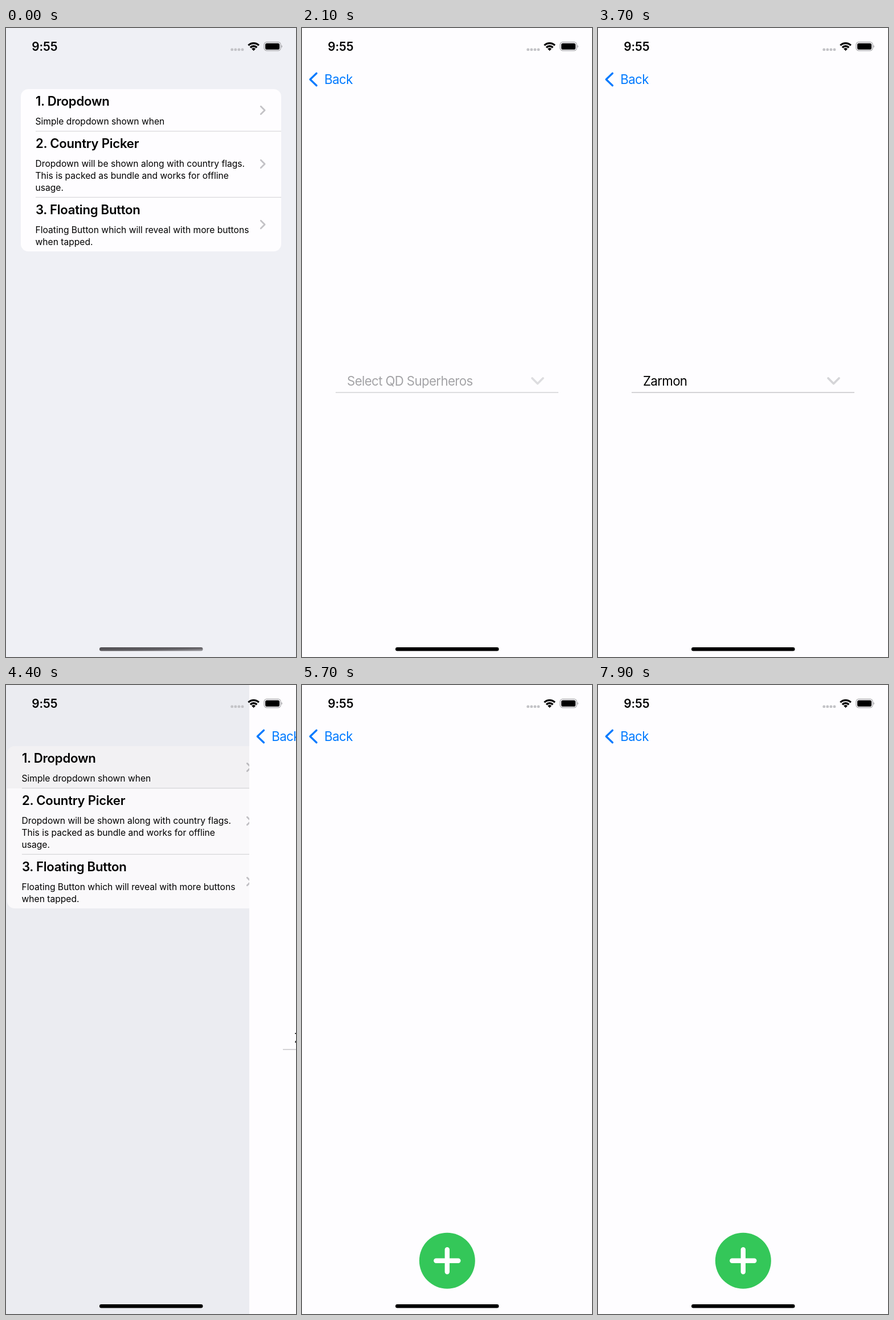
Recreate the animation shown at these times as an HTML page. Size 509x1101 px, loop 8 s.

```html
<!DOCTYPE html>
<html lang="en">
<head>
<meta charset="utf-8">
<title>Component demo</title>
<style>
  html, body { margin: 0; width: 100%; height: 100%; overflow: hidden; background: #fefdff; }
  svg { display: block; font-family: Inter, "Noto Sans", sans-serif; }
  .title { font-size: 22.2px; font-weight: 600; letter-spacing: -0.27px; }
  .note { font-size: 15.66px; letter-spacing: -0.02px; }
  .body { font-size: 22.2px; letter-spacing: -0.6px; }
  .clock { font-size: 20.9px; font-weight: 600; letter-spacing: -0.1px; }
  .line { fill: none; stroke-linecap: round; stroke-linejoin: round; }
</style>
</head>
<body>
<svg width="509" height="1101" viewBox="0 0 509 1101">
  <defs>
    <clipPath id="cardClip"><rect x="26" y="107" width="457" height="284" rx="13"/></clipPath>
    <clipPath id="menuClip"><rect x="92" y="303" width="326" height="287" rx="16"/></clipPath>
    <linearGradient id="barFade" x2="1" y2="1">
      <stop offset="0" stop-color="#4f4d51"/>
      <stop offset=".6" stop-color="#615f63"/>
      <stop offset="1" stop-color="#a09fa4"/>
    </linearGradient>
  </defs>

  <rect width="509" height="1101" fill="#eff0f5"/>
  <g id="list">
    <g clip-path="url(#cardClip)">
      <rect x="26" y="107" width="457" height="284" fill="#fefdff"/>
      <path d="M52 180.7H483M52 296.3H483" stroke="#d9d9dc" stroke-width="1.2"/>
      <rect id="rowTop" x="26" y="107" width="457" height="74" fill="#cbcbcf"/>
      <rect id="rowEnd" x="26" y="296" width="457" height="95" fill="#cbcbcf"/>
    </g>
    <g id="rows"></g>
  </g>
  <rect id="shade" width="509" height="1101"/>

  <g id="dropPage">
    <rect width="509" height="1101" fill="#fefdff"/>
    <g class="back"></g>
    <g id="field">
      <text id="choice" class="body" x="79" y="626"></text>
      <path class="line" d="M404 613l9.5 9.5 9.5-9.5" stroke="#d5d5d8" stroke-width="3.8"/>
      <path d="M59 638H450" stroke="#c6c6c9" stroke-width="1.3"/>
    </g>
    <g id="menu">
      <g clip-path="url(#menuClip)">
        <rect x="92" y="303" width="326" height="287" fill="#f4f3f6"/>
        <g id="items"></g>
      </g>
    </g>
  </g>

  <g id="fabPage">
    <rect width="509" height="1101" fill="#fefdff"/>
    <g class="back"></g>
    <g id="extras" fill="#34c759"></g>
    <circle cx="254.8" cy="1007.7" r="49" fill="#34c759"/>
    <path id="plus" class="line" d="M235.3 1007.7h39M254.8 988.2v39" stroke="#fff" stroke-width="8.4"/>
  </g>

  <text class="clock" x="45.2" y="40">9:55</text>
  <g fill="#c3c3c7" id="dots"></g>
  <g fill="none" stroke="#000" stroke-width="3.4">
    <path d="M425.4 30.4a13 13 0 0 1 18.4 0"/>
    <path d="M428.9 34.2a8 8 0 0 1 11.4 0"/>
    <path d="M434.6 40l-3.4-3.5a4.8 4.8 0 0 1 6.8 0z" fill="#000" stroke="none"/>
  </g>
  <rect x="453.1" y="24.7" width="29" height="15" rx="4.6" fill="none" stroke="#a3a3a6" stroke-width="1.3"/>
  <rect x="455.1" y="26.7" width="25" height="11" rx="2.8"/>
  <path d="M483.5 29.7q3 2.5 0 5z" fill="#a3a3a6"/>
  <rect id="bar" x="164" y="1084" width="181.5" height="6.4" rx="3.2"/>
</svg>

<script>
const STAGE = 509, LOOP = 8000, STEP = 100;
const OPEN_DROP = 411, CLOSE_DROP = 4220, OPEN_FAB = 4974.2;
const $ = id => document.getElementById(id);
const text = (cls, x, y, s) => `<text class="${cls}" x="${x}" y="${y}">${s}</text>`;
const clamp = v => Math.min(1, Math.max(0, v));
const ramp = (t, a, b) => clamp((t - a) / (b - a));

// Critically damped spring from 0 to 1
const spring = (ms, rate = 18.26) => {
  const x = Math.max(0, ms) * rate / 1000;
  return 1 - (1 + x) * Math.exp(-x);
};

const rows = [
  { y: 136, mid: 144, title: "1. Dropdown", notes: ["Simple dropdown shown when"] },
  { y: 210, mid: 238, title: "2. Country Picker", notes: [
    "Dropdown will be shown along with country flags.",
    "This is packed as bundle and works for offline",
    "usage."] },
  { y: 326, mid: 344, title: "3. Floating Button", notes: [
    "Floating Button which will reveal with more buttons",
    "when tapped."] }
];
$("rows").innerHTML = rows.map(r =>
  text("title", 52, r.y, r.title) +
  r.notes.map((n, i) => text("note", 51.5, r.y + 33.3 + i * 20.9, n)).join("") +
  `<path class="line" d="M447.3 ${r.mid - 6.7}l6.8 6.7-6.8 6.7" stroke="#3c3c43" stroke-opacity=".3" stroke-width="2.8"/>`
).join("");

document.querySelectorAll(".back").forEach(g => {
  g.innerHTML = '<path class="line" d="M25.5 79.3L14.3 90l11.2 10.7" stroke="#007aff" stroke-width="3.3"/>' +
    '<text class="body" x="39.3" y="98" fill="#007aff">Back</text>';
});

const heroes = ["Zarmon", "Quillax", "Brovian", "Tessik", "Moldrun"];
$("items").innerHTML = heroes.map((name, i) => {
  const y = 303 + i * 57.4;
  return text("body", 113, y + 36.5, name) +
    (i ? `<path d="M92 ${y}h326" stroke="#d9d9dc" stroke-width="1"/>` : "");
}).join("");

$("dots").innerHTML = [0, 1, 2, 3].map(i =>
  `<rect x="${394.4 + i * 6.1}" y="35.6" width="4.6" height="4.4" rx="1.6"/>`).join("");
$("extras").innerHTML = '<circle cx="254.8"/>'.repeat(3);
const extras = [...$("extras").children];

function slide(id, p) {
  const g = $(id);
  g.setAttribute("transform", `translate(${Math.round(STAGE * (1 - p))} 0)`);
  g.setAttribute("visibility", p > 0.001 ? "visible" : "hidden");
}

function draw(t) {
  const leave = spring(t - CLOSE_DROP);
  const drop = clamp(spring(t - OPEN_DROP) - leave);
  const fab = spring(t - OPEN_FAB);
  const cover = Math.max(drop, fab);

  $("list").setAttribute("transform", `translate(${Math.round(-0.3 * STAGE * cover)} 0)`);
  $("shade").setAttribute("opacity", 0.1 * cover);
  $("rowTop").setAttribute("opacity", t > OPEN_DROP ? 1 - leave : 0);
  $("rowEnd").setAttribute("opacity", t > OPEN_FAB ? 1 : 0);
  slide("dropPage", drop);
  slide("fabPage", fab);

  const picked = t >= 3300;
  $("choice").textContent = picked ? heroes[0] : "Select QD Superheros";
  $("choice").setAttribute("fill", picked ? "#000" : "#8a8a8e");
  $("field").setAttribute("opacity", 1 - 0.22 * ramp(t, 2000, 2100) * (1 - ramp(t, 2200, 2500)));

  const open = spring(t - 2130, 14) - spring(t - 3080, 16);
  const size = 0.2 + 0.8 * open;
  $("menu").setAttribute("opacity", clamp(open * 1.4));
  $("menu").setAttribute("display", open > 0.01 && t < 3700 ? "inline" : "none");
  $("menu").setAttribute("transform", `translate(254.8 590) scale(${size}) translate(-254.8 -590)`);

  const reveal = t < 7900 ? clamp(spring(t - 5950, 10) - spring(t - 7200, 12)) : 0;
  $("plus").setAttribute("transform", `rotate(${45 * reveal} 254.8 1007.7)`);
  extras.forEach((c, i) => {
    c.setAttribute("cy", 1007.7 - reveal * (100 + i * 88));
    c.setAttribute("r", 36 * reveal);
  });

  $("bar").setAttribute("fill", t < 500 ? "url(#barFade)" : "#000");
}

function tick() {
  const t = performance.now() % LOOP;
  draw(Math.floor(t / STEP) * STEP);
  requestAnimationFrame(tick);
}
tick();
</script>
</body>
</html>
```
